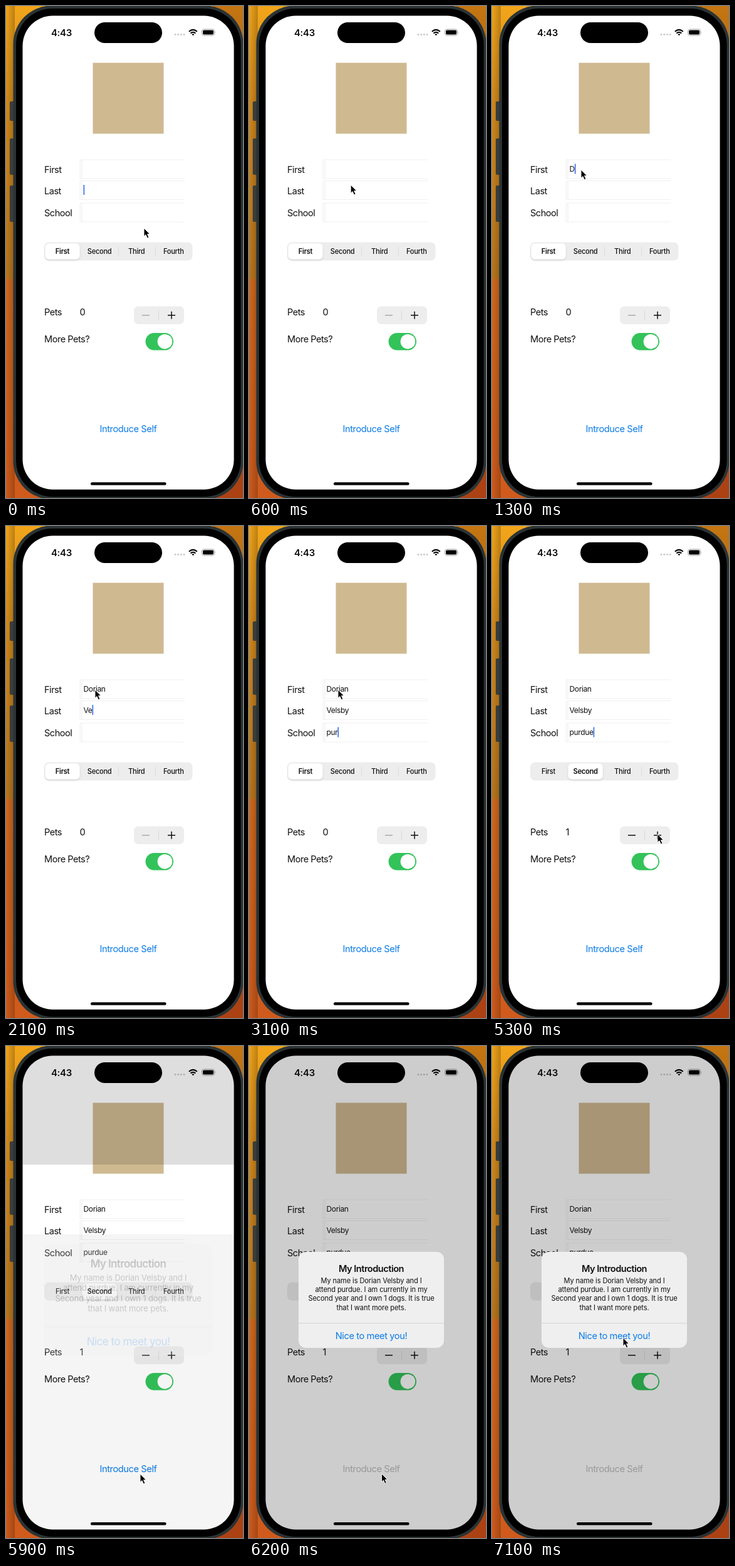
Recreate the animation shown at these times as an HTML page. Size 378 by 784 pixels, loop 7200 ms.

```html
<!DOCTYPE html>
<html lang="en">
<head>
<meta charset="utf-8">
<title>Introduction form</title>
<style>
html, body { margin: 0; width: 100%; height: 100%; overflow: hidden; background: #000; }
svg { display: block; width: 378px; height: 784px; }
text { font: 14.6px Inter, "Liberation Sans", sans-serif; letter-spacing: -.035em; fill: #111; }
.entry { font-size: 12px; letter-spacing: -.03em; }
.seg { font-size: 11.1px; font-weight: 500; letter-spacing: -.025em; }
.time { font-weight: 600; font-size: 15px; letter-spacing: -.025em; }
.msg { font-size: 11.1px; letter-spacing: -.01em; }
.title { font-weight: 600; }
.link { fill: #0a7be8; letter-spacing: -.027em; }
.mid { text-anchor: middle; }
</style>
</head>
<body>
<svg viewBox="0 0 378 784">
  <defs>
    <linearGradient id="wall" x2="0" y2="1">
      <stop offset="0" stop-color="#f2a51a"/>
      <stop offset=".2" stop-color="#d18b1d"/>
      <stop offset=".55" stop-color="#b8771f"/>
      <stop offset=".56" stop-color="#d06a20"/>
      <stop offset="1" stop-color="#cf5a1c"/>
    </linearGradient>
    <linearGradient id="shade">
      <stop offset="0" stop-color="#201000" stop-opacity="0"/>
      <stop offset="1" stop-color="#201000" stop-opacity=".25"/>
    </linearGradient>
    <filter id="soft" x="-20%" y="-30%" width="140%" height="170%">
      <feDropShadow dx="0" dy="1.5" stdDeviation="1.5" flood-opacity=".14"/>
    </filter>
    <clipPath id="screen"><rect x="26.5" y="15.5" width="337" height="755" rx="48"/></clipPath>
  </defs>

  <rect width="378" height="784" fill="url(#wall)"/>
  <rect width="14" height="784" fill="url(#shade)"/>
  <rect x="330" width="48" height="784" fill="#5a0800" opacity=".3"/>
  <g fill="#3a3d3c">
    <rect x="6" y="152" width="8" height="31" rx="2"/>
    <rect x="6" y="211" width="8" height="58" rx="2"/>
    <rect x="6" y="286" width="8" height="58" rx="2"/>
  </g>
  <rect x="11.5" y="-.5" width="367" height="786.5" rx="61" fill="#2b3334"/>
  <rect x="16" y="4" width="358.5" height="778" rx="58"/>

  <g clip-path="url(#screen)">
    <rect x="26" y="15" width="338" height="756" fill="#fff"/>
    <text class="time" x="72" y="47.5">4:43</text>
    <g fill="#c9c9c9">
      <circle cx="270" cy="45.5" r="1.4"/><circle cx="274.7" cy="45.5" r="1.4"/>
      <circle cx="279.3" cy="45.5" r="1.4"/><circle cx="284" cy="45.5" r="1.4"/>
    </g>
    <g fill="none" stroke="#000" stroke-width="2">
      <path d="M291.8 40.8Q298.3 35 304.8 40.8M294.3 43.5Q298.3 39.9 302.3 43.5"/>
      <path d="M298.3 47.3l-2-2.2q2-1.5 4 0z" fill="#000" stroke="none"/>
    </g>
    <rect x="312.5" y="37" width="20" height="10" rx="3" fill="none" stroke="#999" stroke-width=".9"/>
    <rect x="314" y="38.5" width="17" height="7" rx="1.8"/>
    <path d="M333.6 40.3q1.6 1.7 0 3.4z" fill="#999"/>

    <rect x="138.5" y="90.5" width="113" height="113" fill="#cfb991"/>

    <text x="61" y="266">First</text>
    <text x="61" y="299.5">Last</text>
    <text x="61" y="335">School</text>
    <g id="fields"></g>
    <rect id="caret" width="1.7" height="16" fill="#3c72ea"/>

    <rect x="61" y="376.5" width="236.5" height="29" rx="7.5" fill="#ededee"/>
    <path id="rule1" d="M179.5 384v14" stroke="#dcdcde"/>
    <path d="M238.5 384v14" stroke="#dcdcde"/>
    <rect id="thumb" x="62.5" y="378.3" width="55" height="25.4" rx="6" fill="#fff" filter="url(#soft)"/>
    <g id="years"></g>

    <text x="61" y="493">Pets</text>
    <text id="count" x="117.5" y="493">0</text>
    <rect x="204" y="478.5" width="80" height="28.5" rx="7" fill="#ededee"/>
    <path d="M243.5 485.5v14.5" stroke="#d8d8da"/>
    <path id="minus" d="M217 492.8h12" stroke-width="1.4"/>
    <path d="M258 492.8h12M264 486.8v12" stroke="#111" stroke-width="1.5"/>

    <text x="61" y="536">More Pets?</text>
    <rect x="222.5" y="521" width="44.5" height="27.5" rx="13.75" fill="#33c35a"/>
    <circle cx="253.4" cy="534.7" r="11.8" fill="#fff"/>

    <text id="intro" class="link mid" x="195" y="679.3">Introduce Self</text>

    <g id="dim">
      <rect x="26" y="15" width="338" height="174"/>
      <rect x="26" y="189" width="338" height="111"/>
      <rect x="26" y="300" width="338" height="471"/>
    </g>
    <rect x="141" y="26" width="108" height="33" rx="16.5"/>
    <rect x="135" y="759" width="120.5" height="4.5" rx="2.2"/>

    <g id="alert" class="mid">
      <rect x="79" y="328" width="232" height="153" rx="12" fill="#efefef"/>
      <path d="M79 441.8h232" stroke="#cfcfd1" stroke-width=".9"/>
      <text class="title" x="195" y="360.3">My Introduction</text>
      <g id="msg"></g>
      <text class="link" x="195" y="467.3">Nice to meet you!</text>
    </g>
  </g>

  <path id="pointer" d="M0 0V13.2L3 10.5 5.3 15.8 7.8 14.7 5.5 9.5H9.5Z" stroke="#fff" stroke-width=".9"/>
</svg>
<script>
const LOOP = 7200, STEP = 100;
const $ = id => document.getElementById(id);

function add(parent, tag, attrs, label = '') {
  const el = document.createElementNS('http://www.w3.org/2000/svg', tag);
  for (const key in attrs) el.setAttribute(key, attrs[key]);
  el.textContent = label;
  return parent.appendChild(el);
}

// Each field: box top, value, time of focus, key press times
const fields = [
  { top: 245, value: 'Dorian', focus: 900, keys: [1300, 1400, 1500, 1600, 1700, 1800] },
  { top: 278.5, value: 'Velsby', focus: 1900, keys: [2000, 2100, 2200, 2300, 2400, 2500] },
  { top: 314, value: 'purdue', focus: 2700, keys: [2800, 2900, 3100, 3200, 3400, 3500] }
];
for (const f of fields) {
  add($('fields'), 'rect', { x: 117, y: f.top, width: 5.5, height: 30, fill: '#f8f8f8' });
  add($('fields'), 'path', { d: `M118 ${f.top}h167m0 30h-167`, stroke: '#f0f0f0', fill: 'none' });
  f.text = add($('fields'), 'text', { class: 'entry', x: 123.5, y: f.top + 19.4 });
}

const years = ['First', 'Second', 'Third', 'Fourth'].map((name, i) =>
  add($('years'), 'text', { class: 'seg mid', x: 90 + i * 59.1, y: 395 }, name));

['My name is Dorian Velsby and I', 'attend purdue. I am currently in my',
  'Second year and I own 1 dogs. It is true', 'that I want more pets.'
].forEach((line, i) => add($('msg'), 'text', { class: 'msg', x: 195, y: 378 + i * 14.2 }, line));

// time, x, y
const path = [
  [0, 220, 354], [900, 142, 261], [3600, 142, 261], [4200, 230, 432], [4400, 230, 432],
  [4700, 149, 390], [4900, 149, 390], [5200, 264, 491], [5300, 264, 491], [5600, 214, 682],
  [5900, 214, 682], [6200, 211.5, 681.5], [6600, 211.5, 681.5], [7100, 209, 465], [LOOP, 209, 465]
];

// start, dim of the three bands, alert opacity, alert scale
const fades = [
  [0, [0, 0, 0], 0, 1.2],
  [5900, [.13, 0, .04], .2, 1.16],
  [6000, [.16, .16, .16], .65, 1.06],
  [6100, [.19, .19, .19], .92, 1.02],
  [6200, [.195, .195, .195], 1, 1]
];

const clamp = v => Math.min(1, Math.max(0, v));
const ease = v => v * v * (3 - 2 * v);

function pointerAt(t) {
  const i = path.findIndex(p => p[0] > t);
  const [t0, x0, y0] = path[i - 1], [t1, x1, y1] = path[i];
  const k = ease((t - t0) / (t1 - t0));
  return `translate(${x0 + (x1 - x0) * k} ${y0 + (y1 - y0) * k})`;
}

function drawFields(t) {
  let active = fields[1], since = 0;
  for (const f of fields) {
    const typed = f.keys.filter(k => k <= t);
    f.text.textContent = f.value.slice(0, typed.length);
    if (t >= f.focus) {
      active = f;
      since = typed.length ? typed[typed.length - 1] : f.focus;
    }
  }
  const width = active.text.textContent ? active.text.getComputedTextLength() : 0;
  $('caret').setAttribute('x', 123.5 + width);
  $('caret').setAttribute('y', active.top + 6.5);
  $('caret').style.opacity = t < 5800 && (t - since) % 800 < 500 ? 1 : 0;
}

function drawControls(t) {
  const slide = ease(clamp((t - 4700) / 300));
  $('thumb').setAttribute('transform', `translate(${slide * 59.1} 0)`);
  $('rule1').style.opacity = 1 - slide;
  years.forEach((y, i) => y.style.fontWeight = i === (slide > .5 ? 1 : 0) ? 600 : 500);
  const pets = t >= 5300 ? 1 : 0;
  $('count').textContent = pets;
  $('minus').setAttribute('stroke', pets ? '#111' : '#aaa');
}

function drawAlert(t) {
  const [, dims, opacity, scale] = fades.filter(f => f[0] <= t).pop();
  [...$('dim').children].forEach((r, i) => r.style.opacity = dims[i]);
  $('alert').style.opacity = opacity;
  $('alert').setAttribute('transform', `translate(195 404.5) scale(${scale}) translate(-195 -404.5)`);
  $('intro').style.fill = t >= 6000 ? '#bdbdbd' : '';
  $('intro').style.opacity = t === 5800 ? .4 : 1;
}

function draw(now) {
  const t = Math.floor(now % LOOP / STEP) * STEP;
  drawFields(t);
  drawControls(t);
  drawAlert(t);
  $('pointer').setAttribute('transform', pointerAt(t));
}

function tick(now) {
  draw(now);
  requestAnimationFrame(tick);
}
draw(0);
requestAnimationFrame(tick);
</script>
</body>
</html>
```
